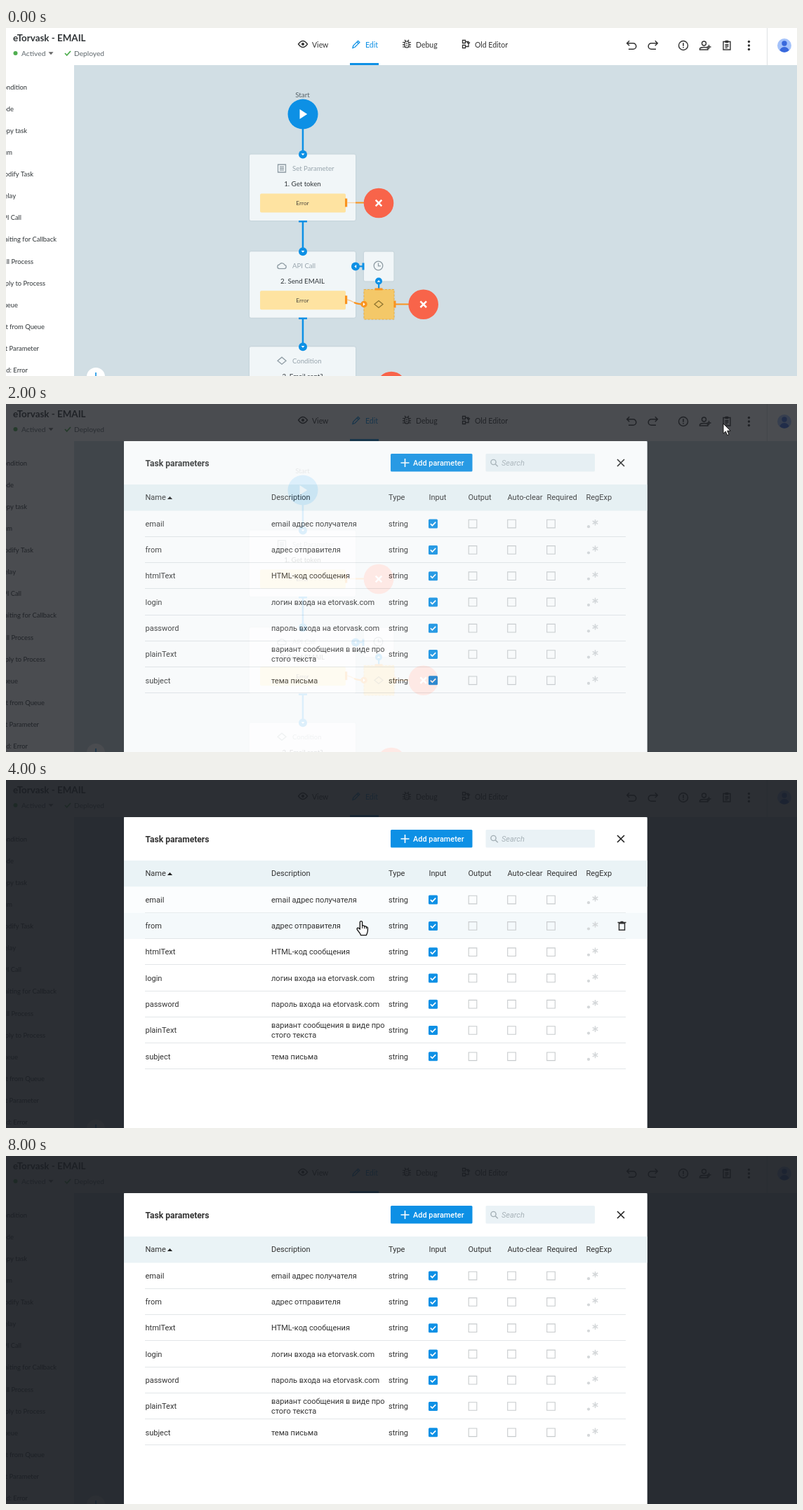
Animation, 1127 px wide and 497 px high, one loop 8.75 s. Source, as an HTML page with a canvas:

```html
<!DOCTYPE html>
<html lang="en">
<head>
<meta charset="utf-8">
<title>Task parameters</title>
<style>
html, body { margin: 0; width: 100%; height: 100%; overflow: hidden; background: #d1dee4; }
canvas { display: block; width: 1127px; height: 497px; }
</style>
</head>
<body>
<canvas id="stage"></canvas>
<script>
const W = 1127, H = 497, LOOP = 8750, STEP = 250;
const BLUE = '#0d90e5', ORANGE = '#f9931f', RED = '#f8644a', INK = '#333', GREY = '#8f9ca4';
const cv = document.getElementById('stage'), c = cv.getContext('2d');
const dpr = window.devicePixelRatio || 1;
cv.width = W * dpr;
cv.height = H * dpr;

function rect(x, y, w, h, fill, r = 0) {
  c.fillStyle = fill;
  c.beginPath();
  c.roundRect(x, y, w, h, r);
  c.fill();
}

function disc(x, y, r, fill) {
  c.fillStyle = fill;
  c.beginPath();
  c.arc(x, y, r, 0, 7);
  c.fill();
}

// Strokes and fills a small path whose origin is placed at x, y.
function icon(x, y, d, stroke, width = 1.3, fill) {
  const p = new Path2D(d);
  c.save();
  c.translate(x, y);
  c.lineWidth = width;
  if (fill) { c.fillStyle = fill; c.fill(p); }
  if (stroke) { c.strokeStyle = stroke; c.stroke(p); }
  c.restore();
}

function ring(x, y, r, color, width = 1.3) {
  c.strokeStyle = color;
  c.lineWidth = width;
  c.beginPath();
  c.arc(x, y, r, 0, 7);
  c.stroke();
}

// y is the middle of the capital letters.
function label(s, x, y, size, color = INK, align = 'left', font = 'Lato', style = '') {
  c.font = `${style} ${size}px ${font}, sans-serif`;
  c.textAlign = align;
  c.fillStyle = color;
  c.fillText(s, x, y + size * 0.36);
}

const roboto = (s, x, y, color, style, size = 11) => label(s, x, y, size, color, 'left', 'Roboto', style);

// ---- editor behind the dialog ----

const TOOLS = [
  ['Condition', 30], ['Code', 11], ['Copy task', 30], ['Sum', 9], ['Modify Task', 39],
  ['Delay', 14], ['API Call', 22], ['Waiting for Callback', 72], ['Call Process', 39],
  ['Reply to Process', 56], ['Queue', 17], ['Get from Queue', 55], ['Set Parameter', 47], ['End: Error', 31]
];

const DIAMOND = 'M-6 0L0-5L6 0L0 5Z';
const CLOUD = 'M-4 4.5H4A2.7 2.7 0 0 0 4-.8A4.2 4.2 0 0 0-3.6-1.2A2.9 2.9 0 0 0-4 4.5Z';
const LIST = 'M-5.5-5.5H5.5V5.5H-5.5ZM-3-2.3H3M-3 0H3M-3 2.3H3';

function topBar() {
  rect(0, 0, W, 53, '#fff');
  label('eTorvask - EMAIL', 10, 14.5, 13.4, '#2f3336', 'left', 'Lato', 'bold');
  disc(13.5, 36, 3, '#4fae4f');
  label('Actived', 22, 36.5, 10.3, '#5d666b');
  icon(64, 36, 'M-3.5-1.8H3.5L0 2.2Z', null, 1, '#666');
  icon(88, 36, 'M-4 0L-1.3 3L4-3', '#4fae4f', 1.8);
  label('Deployed', 97, 36.5, 10.2, '#5d666b');

  icon(423, 23, 'M-6.5 0Q0-9 6.5 0Q0 9-6.5 0Z', INK);
  disc(423, 23, 2.1, INK);
  label('View', 436, 24, 10.5);
  icon(499, 23, 'M-5 5.5L-4.3 2.3L2.6-4.6L4.8-2.4L-2.1 4.5ZM1-3L3.2-.8', BLUE);
  label('Edit', 512, 24, 10.5, BLUE);
  rect(490, 50, 41, 3, BLUE);
  icon(571, 23, 'M-3-1Q-3-4 0-4Q3-4 3-1V2Q3 5 0 5Q-3 5-3 2ZM-6-2.5H-3M-6 .8H-3M-6 4H-3M6-2.5H3M6 .8H3M6 4H3M-3-6L-1.3-4M3-6L1.3-4M-1.2-.8H1.2M-1.2 2H1.2', INK, 1.2);
  label('Debug', 584, 24, 10.5);
  icon(655, 23, 'M-4.5-5.5H-.5V-1.5H-4.5ZM-4.5 1.5H-.5V5.5H-4.5ZM-.5-3.5H4V-.5M4-.5L2-2.5M4-.5L6-2.5M4-.5V3.5H-.5', INK, 1.3);
  label('Old Editor', 668, 24, 10.5);

  const turn = 'M-6-3.3H2.5A3.9 3.9 0 0 1 2.5 5.3H-4M-2.8-6.8L-6.3-3.3L-2.8 .2';
  icon(891, 25, turn, INK, 1.5);
  c.save();
  c.translate(922, 25);
  c.scale(-1, 1);
  icon(0, 0, turn, INK, 1.5);
  c.restore();
  ring(965, 25, 6.5, INK, 1.4);
  icon(965, 25, 'M0-3.7V.8M0 2V3.6', INK, 1.6);
  ring(994.5, 22, 3, INK, 1.4);
  icon(994.5, 25, 'M-6 6V4.5Q-5 2.5 0 2.5Q5 2.5 5.5 4.5V6ZM7-1V5M4 2H10', INK, 1.4);
  icon(1027, 25, 'M-5-5.5H5V6H-5ZM-2.5-1.3H2.5M-2.5 1H2.5M-2.5 3.4H1', INK, 1.4);
  rect(1024.5, 17.7, 5, 3.5, INK, 1);
  for (const y of [19.5, 25, 30.5]) disc(1058.5, y, 1.7, INK);
  rect(1084, 0, 1, 53, '#dde1e3');
  disc(1109, 25, 10, '#a4c2fa');
  c.save();
  c.beginPath();
  c.arc(1109, 25, 9.7, 0, 7);
  c.clip();
  disc(1109, 22, 3.7, '#3868dc');
  disc(1109, 34, 7, '#3868dc');
  c.restore();
}

function port(x, y, color, angle = 0, r = 6) {
  disc(x, y, r, color);
  c.save();
  c.translate(x, y);
  c.rotate(angle);
  icon(0, 0, 'M-2.4-1.2H2.4L0 1.6Z', null, 1, '#fff');
  c.restore();
}

function fail(x, y) {
  disc(x, y, 21.3, RED);
  icon(x, y, 'M-4.3-4.3L4.3 4.3M4.3-4.3L-4.3 4.3', '#fff', 2.5);
}

function card(x, y, w, h, fill = '#f1f6f8') {
  c.save();
  c.shadowColor = 'rgba(60,90,110,.22)';
  c.shadowBlur = 2 * dpr;
  rect(x, y, w, h, fill, 2);
  c.restore();
}

function node(y, shape, kind, name, error) {
  card(347, y, 151, 94.5);
  icon(393, y + 20, shape, GREY);
  label(kind, 408, y + 20.5, 9.6, '#98a5ad');
  label(name, 422.5, y + 42, 9.7, '#30363a', 'center');
  if (!error) return;
  rect(362, y + 56, 122, 27, '#fee3a1', 2);
  label('Error', 422.5, y + 69.5, 8.3, '#4e4a3f', 'center');
  rect(483, y + 63, 3.2, 12, ORANGE);
}

function link(from, to) {
  rect(421.7, from, 2.5, to - from, BLUE);
  port(423, to, BLUE);
}

function editor() {
  rect(0, 0, W, H, '#d1dee4');
  label('Start', 422.5, 95.5, 9.8, '#535f66', 'center');
  disc(423, 123, 21.5, BLUE);
  icon(423, 123, 'M-4.5-7L6.2 0L-4.5 7Z', null, 1, '#fff');

  node(180.5, LIST, 'Set Parameter', '1. Get token', true);
  node(319.2, CLOUD, 'API Call', '2. Send EMAIL', true);
  node(455.2, DIAMOND, 'Condition', '3. Email sent?', false);
  link(144, 180.5);
  link(275, 319.2);
  link(414, 455.2);
  rect(417, 275, 12, 2.5, BLUE);
  rect(417, 413.5, 12, 2.5, BLUE);

  icon(0, 0, 'M486 249.5H498', '#fbd3a1', 1.4);
  icon(0, 0, 'M498 249.5H511', ORANGE, 2);
  fail(531, 250);

  card(510, 319.5, 42.5, 42);
  ring(530.5, 339.5, 6.3, GREY);
  icon(530.5, 339.5, 'M0-4V.4H3.4', GREY);
  rect(500, 339.3, 9, 2.2, BLUE);
  rect(507.5, 335.5, 3, 10, BLUE);
  port(498, 340.5, BLUE, Math.PI / 2);

  rect(530, 362, 2.3, 11, BLUE);
  card(510, 373.5, 43, 42.5, '#f4c868');
  c.setLineDash([3, 2]);
  icon(0, 0, 'M510 373.5H553V416H510Z', '#e9ae45', 1);
  c.setLineDash([]);
  icon(531, 394.5, DIAMOND, '#8d742f');
  rect(525.5, 371.5, 11, 3, ORANGE);
  port(531, 361.5, BLUE, Math.PI, 5);
  icon(0, 0, 'M486 388Q491 389 496 392', '#fbc78a', 1.4);
  icon(0, 0, 'M496 392Q501 394.5 510 394.5M554 394.5H575', ORANGE, 2);
  port(510, 394.5, ORANGE, -Math.PI / 2, 4.7);
  rect(552.5, 389.5, 3, 10, ORANGE);
  fail(594.7, 394.7);
  fail(549, 512);

  rect(0, 53, 97, H, '#fff');
  TOOLS.forEach(([s, end], i) => label(s, end, 84.5 + 31.08 * i, 9.4, '#2f3437', 'right'));
  disc(128, 498, 13, '#fff');
  icon(128, 498, 'M0-6V6M-6 0H6', BLUE, 1.6);
  topBar();
}

// ---- dialog ----

const TOP = 152.5, ROW = 37.28;
const ROWS = [
  ['email', 'email адрес получателя'], ['from', 'адрес отправителя'], ['htmlText', 'HTML-код сообщения'],
  ['login', 'логин входа на etorvask.com'], ['password', 'пароль входа на etorvask.com'],
  ['plainText', 'вариант сообщения в виде про', 'стого текста'], ['subject', 'тема письма']
];
const HEADS = [['Name', 198.5], ['Description', 378], ['Type', 545], ['Input', 602.5], ['Output', 658.5],
  ['Auto-clear', 714.5], ['Required', 770.5], ['RegExp', 826.5]];

function row([name, text, more], i, hover) {
  const top = TOP + ROW * i, y = top + 18.4;
  if (i === hover) rect(168, top, 745, ROW, '#f4f9fb');
  else if (i < hover) rect(168, top, 745, ROW, '#fbfdfe');
  roboto(name, 198.5, y);
  roboto(text, 378, more ? y - 7 : y);
  if (more) roboto(more, 378, y + 7);
  roboto('string', 545, y);
  rect(602, y - 6.3, 13, 13, BLUE, 1.5);
  icon(608.5, y + .2, 'M-3.6 0L-1.1 2.6L3.7-2.4', '#fff', 1.7);
  for (const x of [665, 720.5, 776.5]) icon(x, y + .2, 'M-5.8-5.8H5.8V5.8H-5.8Z', '#c8cbcd', 1.1);
  disc(830, y + 4.3, 2.1, '#d4d7d9');
  icon(839.5, y - 1.7, 'M0-4.3V4.3M-3.8-2.2L3.8 2.2M3.8-2.2L-3.8 2.2', '#d4d7d9', 1.5);
  if (i === hover) icon(877.5, y, 'M-4-3.5H4V6H-4ZM-6-4.7H6M-2-5.8H2', INK, 1.5);
  rect(198, Math.round(top + ROW) - 1, 685, 1, '#e2e6e8');
}

function dialog(hover) {
  rect(168, 53, 745.5, 447, '#fff', 2);
  roboto('Task parameters', 198.5, 84.5, INK, 'bold', 12.1);
  rect(548, 71, 116.5, 25.5, BLUE, 1.5);
  icon(568.5, 84, 'M-6 0H6M0-6V6', '#fff', 1.6);
  roboto('Add parameter', 580, 84, '#fff', '500', 10.9);
  rect(683.5, 71, 155.5, 25.5, '#eaf2f6', 1.5);
  ring(694.5, 83, 3.6, '#a3afb5', 1.4);
  icon(697.2, 85.7, 'M0 0L3.6 3.6', '#a3afb5', 1.5);
  roboto('Search', 706, 84, '#a7b2b8', 'italic');
  icon(876, 84, 'M-5-5L5 5M5-5L-5 5', '#222', 1.6);
  rect(168, 115, 745.5, 37.5, '#eaf3f6');
  for (const [s, x] of HEADS) roboto(s, x, 133.5);
  icon(233.5, 134, 'M-3.6 2H3.6L0-2Z', null, 1, '#222');
  ROWS.forEach((r, i) => row(r, i, hover));
}

function overlay(alpha, shift, hover) {
  c.save();
  c.translate(0, shift);
  // Shade surrounds the panel only, so the panel fades over the bare page.
  c.fillStyle = `rgba(27,30,35,${0.92 * alpha})`;
  c.beginPath();
  c.rect(0, -shift, W, H);
  c.rect(168, 53, 745.5, 447);
  c.fill('evenodd');
  layer.clearRect(0, 0, W, H + 10);
  const page = c;
  withContext(layer, () => dialog(hover));
  page.globalAlpha = alpha;
  page.drawImage(sheet, 0, 0, W, H + 10);
  page.restore();
}

// ---- pointer and timing ----

// Time, x, y of the pointer tip.
const PATH = [[500, 1030, 42], [1000, 1022, 28], [2250, 1022, 28], [2750, 540, 130],
  [4000, 506, 202], [5750, 495, 314], [7000, 490, 391], [7500, 490, 391]];

function along(t) {
  if (t < PATH[0][0] || t >= PATH[PATH.length - 1][0]) return null;
  const i = PATH.findIndex(p => p[0] > t);
  const [t0, x0, y0] = PATH[i - 1], [t1, x1, y1] = PATH[i];
  const k = (t - t0) / (t1 - t0);
  return { x: x0 + (x1 - x0) * k, y: y0 + (y1 - y0) * k };
}

const ARROW = 'M0 0V14.2L3.3 11.2L5.7 16.6L8 15.6L5.7 10.3H10.2Z';
const HAND = 'M-1.7 1Q-1.7-.4 0-.4Q1.6-.4 1.6 1V6.2Q4.2 5.3 4.6 7Q7 6.4 7.3 8Q9.4 7.6 9.4 9.5V13Q9.2 16 7.4 19.6H-.6Q-2-1-2 16.5Q-4 14-5.8 11.3Q-6.3 9.4-4.5 9.2Q-3 9.4-1.7 11.2Z'
  .replace('Q-2-1-2 16.5', 'Q-1 18-2 16.5');

function pointer(p, hand) {
  c.lineJoin = 'round';
  if (hand) {
    icon(p.x, p.y, HAND, '#111', 1.3, '#fff');
    icon(p.x, p.y, 'M1.6 6.2V10M4.6 7V10.3M7.3 8V10.6', '#111', 1);
  } else icon(p.x, p.y, ARROW, '#111', 1, '#fff');
  c.lineJoin = 'miter';
}

function tooltip(alpha) {
  c.save();
  c.globalAlpha = alpha;
  disc(1027, 25, 14, 'rgba(0,0,0,.06)');
  icon(1027, 25, 'M-5-5.5H5V6H-5ZM-2.5-1.3H2.5M-2.5 1H2.5M-2.5 3.4H1', INK, 1.4);
  rect(992, 42, 71.5, 17, '#6b6c6e', 1);
  label('Task parametrs', 1027.5, 50.8, 8.8, '#fff', 'center', 'Lato', 'bold');
  c.restore();
}

function draw(t) {
  const p = along(t);
  editor();
  if (t >= 1000 && t < 2000) tooltip(Math.min(1, (t - 750) / 500));
  if (t >= 1750) {
    const open = t < 2000 ? 0.28 : t < 2250 ? 0.86 : t < 2500 ? 0.98 : 1;
    const i = p && t >= 3000 ? Math.floor((p.y - TOP) / ROW) : -1;
    overlay(open, t < 2000 ? -31 : 0, i);
  }
  if (p) pointer(p, t >= 3000 && p.y > TOP);
}

const sheet = document.createElement('canvas');
sheet.width = W * dpr;
sheet.height = (H + 10) * dpr;
const layer = sheet.getContext('2d');
layer.scale(dpr, dpr);
c.scale(dpr, dpr);
</script>
<script>
// Lets the drawing helpers work on another context for a while.
const proxied = ['save', 'restore', 'translate', 'beginPath', 'roundRect', 'arc', 'fill', 'stroke', 'fillText'];
const props = ['fillStyle', 'strokeStyle', 'lineWidth', 'font', 'textAlign'];
function withContext(other, paint) {
  for (const m of proxied) c[m] = (...a) => other[m](...a);
  for (const k of props) Object.defineProperty(c, k, { configurable: true, set: v => { other[k] = v; } });
  paint();
  for (const k of [...proxied, ...props]) delete c[k];
}

const start = performance.now();
function tick() {
  const t = (performance.now() - start) % LOOP;
  draw(Math.floor(t / STEP) * STEP);
  requestAnimationFrame(tick);
}
tick();
</script>
</body>
</html>
```
